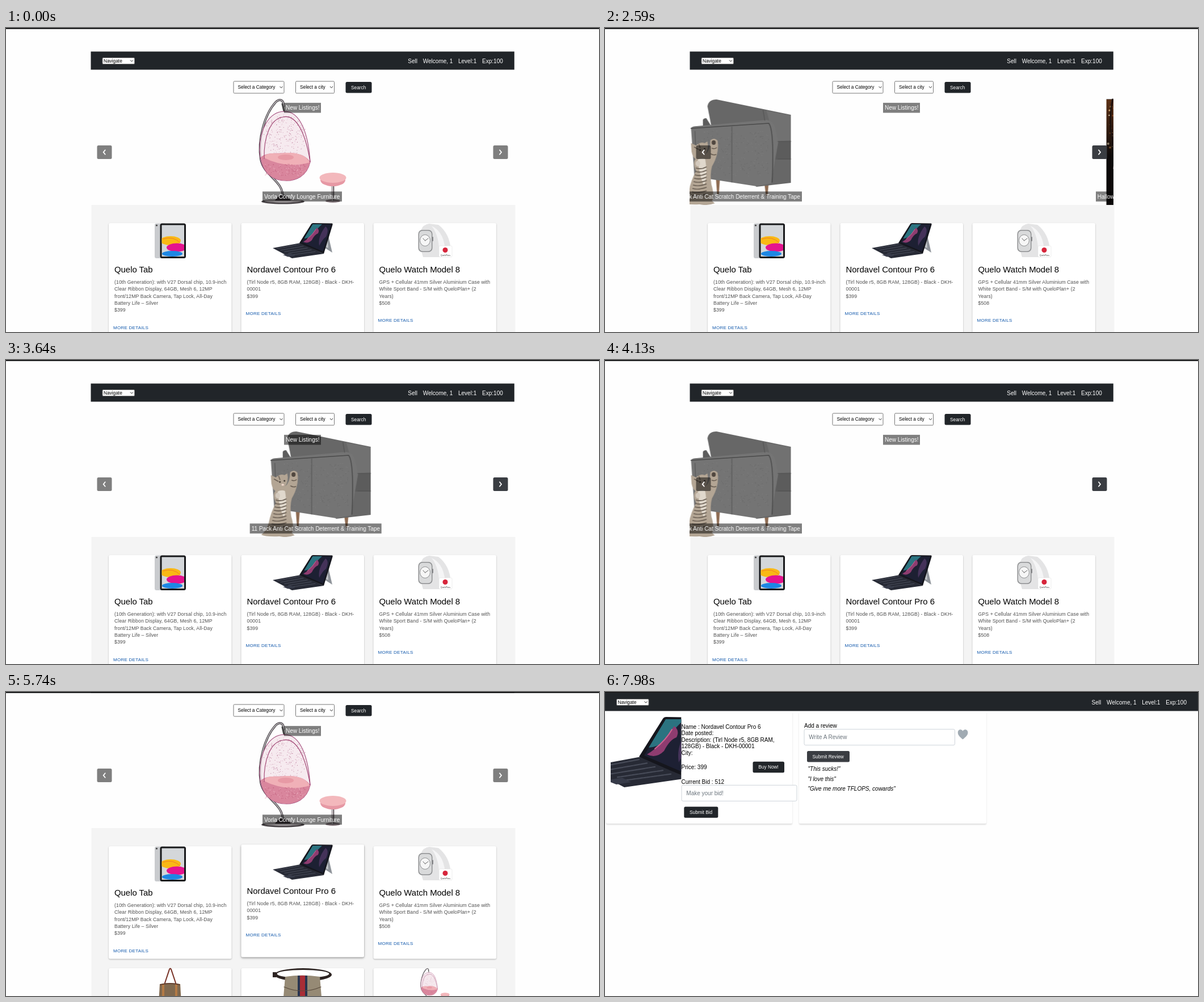
Animation of 1045x536 px, one loop 8000 ms. Source, as an HTML page:

```html
<!DOCTYPE html>
<html lang="en">
<head>
<meta charset="utf-8">
<title>Listings</title>
<style>
html, body { margin: 0; width: 100%; height: 100%; overflow: hidden; background: #fefefe; }
svg { display: block; width: 1045px; height: 536px; font-family: "Liberation Sans", Arial, sans-serif; }
text { white-space: pre; }
.card { fill: #fff; filter: drop-shadow(0 1px 1px rgba(0,0,0,.28)); }
.lift { fill: #fff; filter: drop-shadow(0 2px 2px rgba(0,0,0,.22)); }
.panel { fill: #fff; filter: drop-shadow(0 2.5px 1px rgba(0,0,0,.13)); }
.desc { font-size: 8.7px; letter-spacing: .093px; fill: #505050; }
.link { font-size: 8.06px; letter-spacing: .23px; fill: #1259ac; }
</style>
</head>
<body>
<svg id="stage" viewBox="0 0 1045 536" xmlns="http://www.w3.org/2000/svg"></svg>
<script>
const LOOP = 8000, SLIDE = 746, DARK = '#212529';

let seed = 7;
const rnd = () => (seed = (seed * 16807) % 2147483647) / 2147483647;
const many = (n, f) => Array.from({ length: n }, (_, i) => f(i)).join('');

const text = (x, y, size, s, attr = '') => `<text x="${x}" y="${y}" font-size="${size}" ${attr}>${s}</text>`;
const rect = (x, y, w, h, fill, attr = '') => `<rect x="${x}" y="${y}" width="${w}" height="${h}" fill="${fill}" ${attr}/>`;
const oval = (x, y, rx, ry, fill, attr = '') => `<ellipse cx="${x}" cy="${y}" rx="${rx}" ry="${ry}" fill="${fill}" ${attr}/>`;
const path = (d, fill, attr = '') => `<path d="${d}" fill="${fill}" ${attr}/>`;
const line = (d, color, w, attr = '') => path(d, 'none', `stroke="${color}" stroke-width="${w}" stroke-linecap="round" ${attr}`);
const group = (x, y, body, attr = '') => `<g transform="translate(${x} ${y})" ${attr}>${body}</g>`;

const button = (x, y, w, s, tx, id = '') =>
  rect(x, y, w, 19.5, DARK, `rx="2.5" ${id && `id="${id}"`}`) + text(tx, y + 12.7, 8.3, s, 'fill="#fff"');
const arrow = (x, y) => line(`M${x - 2.2} ${y - 1.2} l2.2 2.4 l2.2 -2.4`, '#333', 1);
const select = (x, y, w, h, s, tx) =>
  rect(x + .5, y + .5, w - 1, h - 1, '#fff', 'rx="1.5" stroke="#777"') +
  text(tx, y + h / 2 + 2.9, 8.3, s) + arrow(x + w - 5.5, y + h / 2);
const field = (x, y, w, s) =>
  rect(x, y, w, 28, '#fff', 'rx="2.5" stroke="#ced4da"') + text(x + 8.3, y + 17.6, 10, s, 'fill="#6c757d"');
const label = (x, y, w, s) =>
  rect(x, y, w, 17.6, 'rgba(0,0,0,.5)') + text(x + 3, y + 12.3, 10, s, 'fill="#fff"');

const nav = (x, w, y) =>
  rect(x, y, w, 32, DARK) + select(x + 20, y + 10.5, 57.5, 12, 'Navigate', x + 22.5) +
  ['Sell', 'Welcome, 1', 'Level:1', 'Exp:100'].map((s, i) =>
    text(x + w - [187.5, 161, 98.8, 56.7][i], y + 20, 10, s, 'fill="#fff"')).join('');

function chair() {
  const specks = many(300, () => {
    const a = rnd() * 6.283, r = Math.sqrt(rnd());
    return oval((492 + 38 * r * Math.cos(a)).toFixed(1), (190 + 38 * r * Math.sin(a)).toFixed(1), .55, .55, rnd() < .4 ? '#b2708f' : '#dcaec4');
  });
  const tube = 'M489 138 C490 126 482 124 475 131 C456 152 443 196 449 232 C455 262 489 268 488 300';
  return oval(488, 306, 38, 4.5, '#4b4649') + oval(488, 304.5, 33, 3, '#b9b4b6') +
    path('M474 304 Q488 284 502 304 Z', '#3b3538') +
    line(tube, '#4b464a', 3.8) + line(tube, '#c9c6ca', 1.4) +
    line('M487 134 L490 147', '#444', 3) +
    path('M490 147 C520 146 533 190 536 236 C530 262 510 270 491 269 C462 268 447 245 447 215 C447 180 462 148 490 147 Z', '#f3e3ea', 'fill-opacity=".75" stroke="#a34c7c" stroke-width="1.2"') +
    specks +
    path('M449 228 C460 218 480 222 492 220 C515 220 528 224 536 236 C530 262 510 270 491 269 C465 268 452 250 449 228 Z', '#d9869d') +
    path('M453 228 C462 216 478 224 492 220 C515 219 530 225 535 237 Q494 249 453 228 Z', '#f0b0b7') +
    oval(493, 228, 14, 5, '#e79aa5') +
    many(110, () => oval((456 + rnd() * 72).toFixed(1), (240 + rnd() * 20).toFixed(1), .7, .7, rnd() < .6 ? '#c46681' : '#eab0bf')) +
    line('M455 230 C454 192 466 160 488 157 C514 151 529 192 536 236', '#9c3d6d', 1.1) +
    oval(576, 305, 13, 3, '#8c7f84') + line('M576 276 V304', '#7d767a', 5) + line('M575 276 V304', '#e4e0e2', 1.5) +
    oval(576, 268, 22, 11, '#e698a4') + oval(576, 264, 23.5, 9, '#f3b8bc');
}

function cat() {
  return path('M686 218 L685 203 L694 207 Q702 200 709 203 L714 200 Q717 214 710 223 Q719 216 719 198 Q726 192 732 199 Q735 222 722 244 Q718 258 721 276 Q727 296 722 305 L727 309 Q714 314 700 311 Q676 312 668 308 Q677 302 681 288 Q685 268 694 252 Q687 238 693 231 Q688 228 686 218 Z', '#b3a594') +
    path('M697 232 Q704 228 710 231 Q715 260 708 278 Q700 262 697 232 Z', '#e0d8cc') +
    many(9, i => line(`M${694 - i} ${247 + i * 6} q9 3 ${18 + i} -2`, '#675c51', 1.5)) +
    line('M691 210 l7 4 M699 205 l2 6 M722 212 q5 2 8 -1 M720 222 q5 3 9 1', '#675c51', 1.5) +
    oval(701, 215, 1.5, 1.6, '#39332d') + oval(709, 213, 1.4, 1.5, '#39332d') + oval(706, 220, 2.4, 1.7, '#efd8cc') +
    oval(725, 202, 3.6, 4, '#50473f') + oval(697, 239, 4, 5, '#d3c9bd');
}

function couch() {
  return path('M729 266 h7 l-2 27 h-3 Z M814 272 h8 l-2 23 h-3 Z', '#8d6b52') + path('M706 162 Q707 159 712 159 L720 172 L706 176 Z', '#5d5d5d') +
    path('M721 174 L714 138 Q716 126 730 126 L861 153 V273 L800 280 Z', '#676767') +
    path('M818 146 L861 154 V198 L833 200 Z', '#717171') + path('M826 200 L861 200 V232 H828 Z', '#5c5c5c') +
    path('M685 176 Q688 173 695 173 L818 162 Q829 163 833 174 L839 200 L826 274 L800 279 L691 262 Z', '#747474') +
    line('M685 177 L822 168 Q832 180 828 272', '#4a4a4a', 1.6) +
    line('M757 174 V272 M692 182 L695 262 M812 145 L815 163 M838 200 H861 M838 231 H861', '#515151', 1) +
    many(260, () => rect((694 + rnd() * 128).toFixed(1), (180 + rnd() * 82).toFixed(1), 1, 1, rnd() < .5 ? '#646464' : '#858585')) +
    cat();
}

function ghost(x, y) {
  const face = path('M-8 -10 l6 4 q-4 4 -6 -4 M8 -10 l-6 4 q4 4 6 -4 M-10 0 q10 8 20 0 q-2 11 -6 11 l-2 -3 l-2 3 l-2 -3 l-3 2 q-4 -3 -5 -10', '#211a22');
  return group(x, y,
    path('M-15 -29 Q0 -37 15 -29 Q0 -26 -15 -29 M-9 -31 L-3 -62 L8 -31 Z', '#0b090b') +
    path('M-10 -30 Q0 -36 10 -30 Q14 2 18 30 L12 27 L9 35 L4 29 L-2 36 L-6 29 L-12 34 L-18 28 Q-13 2 -10 -30 Z', '#ead2d4') +
    oval(0, -18, 7, 9, '#f8e7e2') + face);
}

function party() {
  return rect(429, 125.5, 187, 187, '#0c0909') + rect(429, 126, 187, 100, 'url(#glow)') +
    many(230, () => {
      const y = rnd() * 85, r = .5 + rnd() * 1.7;
      return oval((431 + rnd() * 182).toFixed(1), (128 + y).toFixed(1), r, r, ['#e0924a', '#f3c98a', '#9c552a', '#fff0cb'][rnd() * 4 | 0], `opacity="${(1 - y / 150).toFixed(2)}"`);
    }) +
    many(7, i => line(`M${440 + i * 27} 126 q${i % 2 ? 12 : -9} 40 3 90`, '#1c100c', 3)) +
    ghost(459, 220) + ghost(500, 257) + ghost(543, 215) + ghost(586, 254);
}

const slab = path('M470 388 L519 379 L560 398 L504 406 Z', '#272a35') +
  many(5, i => line(`M${477 + i * 7} ${389 + i * 2.7} L${517 + i * 7} ${381.5 + i * 3.2}`, '#474b58', 1.1, 'stroke-dasharray="2.4 .8" stroke-linecap="butt"')) +
  path('M488 400 l14 -2.5 l8 4 l-13 2 Z', '#373b49') +
  path('M567 362 L575 396 L556 384 Z', '#8f949a') + path('M566 366 L568 388 L558 383 Z', '#c3c7ca') +
  path('M538 345.5 Q539 344 541 344 L575 344.5 Q576 345 575.5 347 L560 398 L517 379 Z', '#15161d') +
  path('M540.5 346 L573 346.5 L558.5 394 L521.5 378 Z', '#1d2033') +
  path('M540.5 346 L557 346 Q546 356 541 365 Q532 371 525.5 371 Z', '#2b7380') +
  path('M548 352 Q553 356 550 362 Q544 364 539 374 Q532 381 524 377 Q536 370 548 352 Z', '#8e3c70') +
  path('M563 350 Q570 354 564 368 Q558 372 552 384 Q549 368 563 350 Z', '#443259') +
  line('M531 372 Q541 364 546 355', '#cf6590', 1);

const tablet = rect(262, 344.5, 20, 61.5, '#c9cbce', 'rx="3"') + oval(265.5, 348, 1.6, 1.6, '#444') +
  rect(271.5, 344.5, 45.5, 61.5, '#17181a', 'rx="3.5"') + rect(274.5, 347.5, 39.5, 55.5, '#d4d7da') +
  `<g clip-path="url(#screen)">${oval(290, 375, 18, 8, '#f9b915')}${oval(301, 387, 18, 7.5, '#e5148e')}${oval(293, 398, 18, 5, '#1d87e4')}</g>` +
  line('M277 372 Q295 366 307 379', '#f27c22', 1);

const watch = path('M731 357 Q735 346 746 345 L762 347 Q782 362 784 392 L764 404 L735 404 L732 394 Z', '#e4e4e5') +
  path('M750 349 Q774 360 774 398 L763 402 Q765 368 750 349 Z', '#f5f5f6') +
  rect(726.5, 356, 25, 39, '#8f9092', 'rx="7"') + rect(728, 357.5, 22, 36, '#d9dadb', 'rx="6"') +
  oval(738.5, 374.5, 9, 10, '#f6f6f6', 'stroke="#77787a" stroke-width=".8"') + line('M738.5 375 L735 371 M738.5 375 L744 371', '#444', .8) +
  rect(751, 368, 2, 8, '#88898b', 'rx="1"') +
  rect(763, 384, 23, 20, '#fff', 'rx="2" stroke="#e3e3e3" stroke-width=".6"') +
  oval(774, 391.5, 4.5, 4.5, '#d7263c') + text(766, 401.8, 3.4, 'QueloPlan+', 'fill="#333"');

const tote = line('M275 600 L288 561 Q289.5 558 291 561 L304 600', '#793428', 2) +
  path('M271 587 Q289 583 307 587 L309 621 H269 Z', '#80694f') + rect(275, 587, 4, 34, '#b37a46') + rect(298, 587, 4, 34, '#b37a46') +
  line('M272 588 Q289 584 306 588', '#5c3628', 1.5);

const pouch = oval(523.5, 570.5, 50.5, 11.5, '#2d2422') + oval(523.5, 569, 46, 7, '#fff') + rect(470, 566, 6, 9, '#2d2422') +
  path('M492 574 Q522 569 553 574 L557 621 H488 Z', '#968a75') + rect(514, 572, 17, 49, '#28344f') + rect(518, 572, 9, 49, '#a82d36') +
  line('M490 592 Q522 606 555 592', '#5a4b3d', 1.2);

const card = (x, y, body) => rect(x, y, 216.5, 198.5, '#fff', 'rx="2.5" class="card"') + body;
const info = (x, title, lines) =>
  text(x + 10, 430.7, 14.9, title) +
  lines.map((s, i) => text(x + 10, 450.8 + i * 12.4, 8.7, s, 'class="desc"')).join('') +
  text(x + 8, 456 + lines.length * 12.4 + 12.5, 8.06, 'MORE DETAILS', 'class="link"');

const swing = chair();
const slides = [
  swing + label(452, 288.3, 140, 'Vorla Comfy Lounge Furniture'),
  group(-242, 0, couch()) + label(406, 288.3, 232, '11 Pack Anti Cat Scratch Deterrent &amp; Training Tape'),
  party() + label(410, 288.3, 225.5, 'Halloween Decorations Outdoor Halloween Decor')
];
const strip = [0, 1, 2, 1, 0].map((n, i) => group(i * SLIDE, 0, slides[n])).join('');

const shop = nav(149.5, 746.3, 41.5) +
  select(400.5, 93.5, 90, 22, 'Select a Category', 408.5) + select(510, 93.5, 69, 22, 'Select a city', 518) + button(598.5, 95, 46, 'Search', 608) +
  `<g clip-path="url(#window)"><g id="strip">${strip}</g></g>` +
  label(490, 131.9, 65, 'New Listings!') +
  rect(160.5, 207, 26, 24, 'rgba(0,0,0,.5)', 'rx="2.5"') + line('M174.7 215.3 L171.7 219 L174.7 222.7', '#fff', 1.8) +
  rect(858.5, 207, 26, 24, 'rgba(0,0,0,.5)', 'rx="2.5" id="next"') + line('M870 215.3 L873 219 L870 222.7', '#fff', 1.8) +
  rect(150.5, 312, 747, 720, '#f4f4f4') +
  card(181, 344, tablet + info(181, 'Quelo Tab', ['(10th Generation): with V27 Dorsal chip, 10.9-inch', 'Clear Ribbon Display, 64GB, Mesh 6, 12MP', 'front/12MP Back Camera, Tap Lock, All-Day', 'Battery Life – Silver', '$399'])) +
  `<g id="hot">${rect(414.5, 344, 216.5, 198.5, '#fff', 'rx="2.5" class="lift" id="shade" opacity="0"')}` +
  card(414.5, 344, rect(417.5, 492.5, 72, 20, '#1565c0', 'rx="2.5" id="wash" opacity="0"') + slab +
    info(414.5, 'Nordavel Contour Pro 6', ['(Tirl Node r5, 8GB RAM, 128GB) - Black - DKH-', '00001', '$399'])) + '</g>' +
  card(647.5, 344, watch + info(647.5, 'Quelo Watch Model 8', ['GPS + Cellular 41mm Silver Aluminium Case with', 'White Sport Band - S/M with QueloPlan+ (2', 'Years)', '$508'])) +
  card(181, 559, tote) + card(414.5, 559, pouch) +
  card(647.5, 559, `<g transform="translate(582.5 517.5) scale(.332)">${swing}</g>`);

const item = rect(0, 0, 1045, 536, '#fefefe') +
  rect(2, 34, 328, 198, '#fff', 'class="panel" rx="2.5"') + rect(342, 34, 330, 198, '#fff', 'class="panel" rx="2.5"') + nav(0, 1045, 1.5) +
  `<g clip-path="url(#crop)"><g transform="translate(-974 -644) scale(2)">${slab}</g></g>` +
  [['Name : Nordavel Contour Pro 6', 64.8], ['Date posted:', 76.3], ['Description: (Tirl Node r5, 8GB RAM,', 87.9], ['128GB) - Black - DKH-00001', 99.4], ['City:', 110.9], ['Price: 399', 136.3], ['Current Bid : 512', 161.7]]
    .map(([s, y]) => text(134.5, y, 10, s)).join('') +
  button(260.5, 122.7, 55.5, 'Buy Now!', 270.3) + field(135, 164.3, 203, 'Make your bid!') + button(139.3, 202.3, 60, 'Submit Bid', 149) +
  text(351, 63.2, 10, 'Add a review') + field(351, 65.7, 265.5, 'Write A Review') + button(356, 104, 75, 'Submit Review', 365.5, 'send') +
  path('M630.5 83.5 C625 79 621.8 76 621.8 71.5 C621.8 66 628.5 64.5 630.5 69 C632.5 64.5 639.5 66 639.5 71.5 C639.5 76 636 79 630.5 83.5 Z', '#a1abb3') +
  ['This sucks!', 'I love this', 'Give me more TFLOPS, cowards'].map((s, i) => text(357.5, 139 + i * 17.7, 10, `"${s}"`, 'font-style="italic"')).join('');

const clip = (id, x, y, w, h) => `<clipPath id="${id}">${rect(x, y, w, h, '#000')}</clipPath>`;
document.getElementById('stage').innerHTML =
  '<defs>' + clip('window', 149.5, 120, 746.5, 192.5) + clip('screen', 274.5, 347.5, 39.5, 55.5) + clip('crop', 10, 43, 124.3, 126) +
  '<linearGradient id="glow" x1="0" y1="0" x2="0" y2="1"><stop stop-color="#5c3116"/><stop offset="1" stop-color="#0c0909"/></linearGradient></defs>' +
  rect(0, 0, 1045, 536, '#fefefe') + `<g id="shop">${shop}</g>` +
  rect(1039, 2.5, 4.6, 281, '#808080', 'rx="2.3" id="bar" opacity="0"') +
  `<g id="item" opacity="0">${item}</g>` + rect(0, 0, 1045, 1.8, '#0c0d0e');

const start = document.timeline.currentTime || 0;
// steps: [ms, value, easing towards the next step]
function play(id, prop, steps) {
  const all = [[0, steps[0][1]], ...steps, [LOOP, steps[steps.length - 1][1]]];
  const frames = all.map(([ms, v, ease]) => ({ offset: ms / LOOP, [prop]: v, easing: ease || 'linear' }));
  document.getElementById(id).animate(frames, { duration: LOOP, iterations: Infinity }).startTime = start;
}
const fade = (id, ms, time, to = 1) => play(id, 'opacity', [[ms, 0], [ms + time, to]]);
const moveY = y => `translate(0px, ${y}px)`;

play('strip', 'transform', [1552, 2470, 3254, 4010].flatMap((ms, i) => [
  [ms, `translate(${-SLIDE * i}px, 0px)`, 'ease'],
  [ms + 500, `translate(${-SLIDE * (i + 1)}px, 0px)`]
]));
play('next', 'fill', [[1250, 'rgba(0,0,0,.5)'], [1400, 'rgb(58,61,66)'], [5560, 'rgb(58,61,66)'], [5700, 'rgba(0,0,0,.5)']]);

const scroll = [[4610, 0], [4690, 51.5], [4900, 65], [5200, 70.5], [5530, 72]];
play('shop', 'transform', scroll.map(([ms, y]) => [ms, moveY(-y)]));
play('bar', 'transform', scroll.map(([ms, y]) => [ms, moveY(y * .525)]));
play('bar', 'opacity', [[4610, 0], [4640, 1], [5580, 1], [5720, 0]]);

play('hot', 'transform', [[5590, moveY(0), 'ease'], [5740, moveY(-3.1)]]);
fade('shade', 5590, 150);
fade('wash', 6010, 200, .05);
fade('item', 6369, 1);
play('send', 'fill', [[7620, DARK], [7780, '#3a3d42']]);
</script>
</body>
</html>
```
